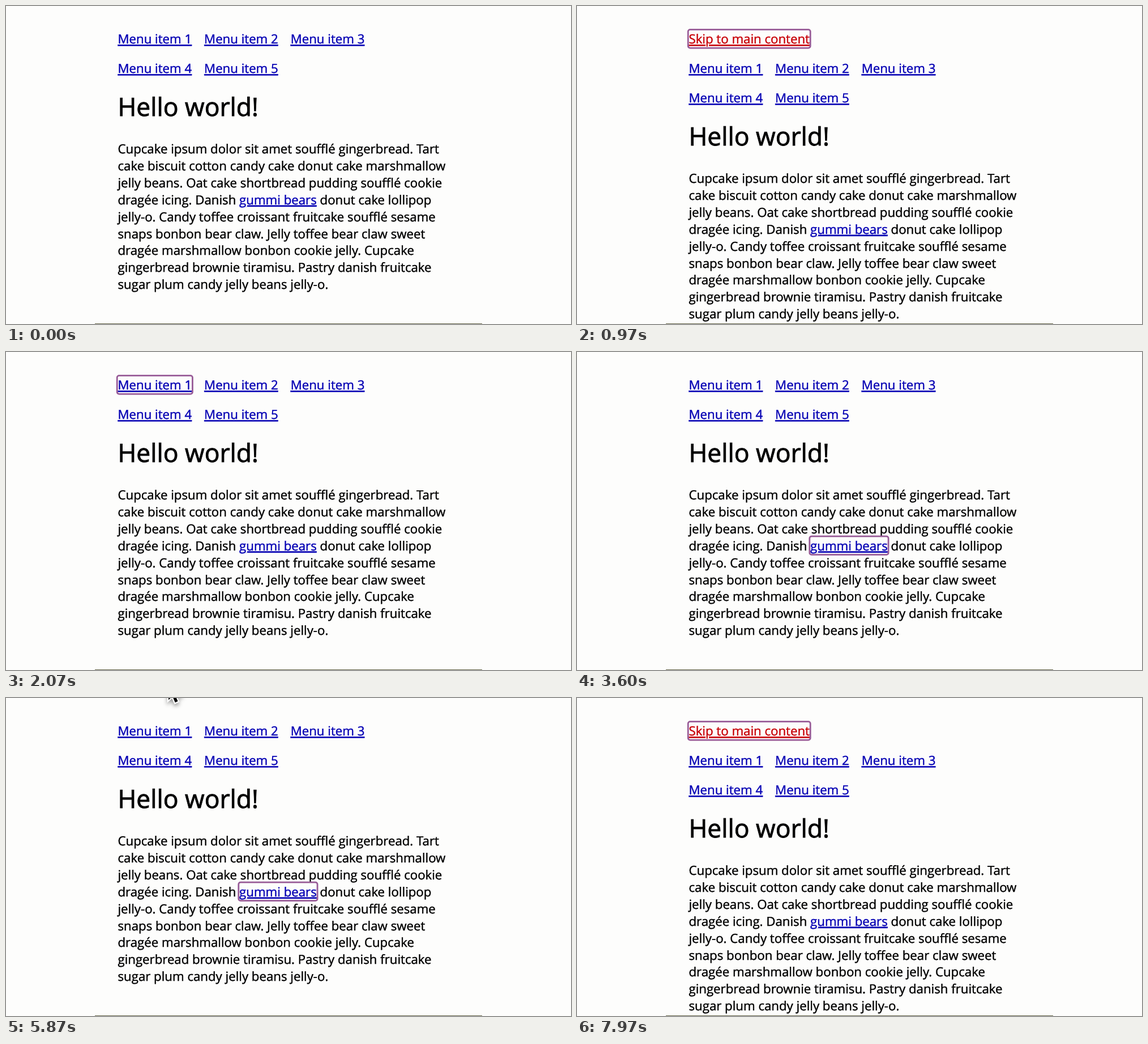
An HTML page that plays this animation: 998 by 561 pixels, repeating every 8000 ms.

```html
<!DOCTYPE html>
<html lang="en">
<head>
<meta charset="utf-8">
<title>Skip link demo</title>
<style>
  html, body { margin: 0; width: 100%; height: 100%; overflow: hidden; background: #fdfdfc; }
  svg { display: block; width: 100%; height: 100%; }
  text { font: 22.22px "Open Sans", sans-serif; text-rendering: geometricPrecision; white-space: pre; fill: #000; stroke: #000; stroke-width: .45px; }
  .title { font-size: 44.44px; stroke-width: .9px; }
  .link { fill: #0500b4; stroke: #0500b4; text-decoration: underline; text-decoration-thickness: 1.5px; text-underline-offset: 2px; }
  #skip { fill: #c80008; stroke: #c80008; }
  #ring { fill: none; stroke: #985b97; stroke-width: 2.8px; }
  #cursor { filter: drop-shadow(0 2px 2px #0006); }
</style>
</head>
<body>
<svg viewBox="0 0 998 561">
  <text id="skip" class="link" x="197.5" y="66.2">Skip to main content</text>
  <g id="page"></g>
  <rect id="ring" rx="3.5"/>
  <rect x="157" y="560" width="684" height="1" fill="#66664a"/>
  <path id="cursor" d="M0 0V16L3.7 12.6 6.2 18.4 8.7 17.3 6.2 11.6H11.2Z" stroke="#fff" stroke-width="2.4" paint-order="stroke"/>
</svg>
<script>
const LOOP = 8000, LEFT = 197.5, LINE = 29.86, MENU_STEP = 152.6, ROW_STEP = 52;
const byId = id => document.getElementById(id);
const page = byId('page'), skip = byId('skip'), ring = byId('ring'), cursor = byId('cursor');

function addText(x, y, content, className = '') {
  const text = document.createElementNS('http://www.w3.org/2000/svg', 'text');
  text.setAttribute('x', x);
  text.setAttribute('y', y);
  text.setAttribute('class', className);
  text.innerHTML = content;
  page.append(text);
}

for (let i = 0; i < 5; i++) {
  addText(LEFT + i % 3 * MENU_STEP, 66.2 + Math.floor(i / 3) * ROW_STEP, `Menu item ${i + 1}`, 'link');
}
addText(LEFT, 194.2, 'Hello world!', 'title');
[
  'Cupcake ipsum dolor sit amet soufflé gingerbread. Tart',
  'cake biscuit cotton candy cake donut cake marshmallow',
  'jelly beans. Oat cake shortbread pudding soufflé cookie',
  'dragée icing. Danish <tspan class="link">gummi bears</tspan> donut cake lollipop',
  'jelly-o. Candy toffee croissant fruitcake soufflé sesame',
  'snaps bonbon bear claw. Jelly toffee bear claw sweet',
  'dragée marshmallow bonbon cookie jelly. Cupcake',
  'gingerbread brownie tiramisu. Pastry danish fruitcake',
  'sugar plum candy jelly beans jelly-o.'
].forEach((line, i) => addText(LEFT, 260.2 + i * LINE, line));

// Tab order: skip link, five menu items, inline link
const links = [...document.querySelectorAll('.link')];
const NONE = -1;
const focusSteps = [
  [0, NONE], [30, 0], [1670, 1], [2140, 2], [2500, 3],
  [2870, 4], [3230, 5], [3600, 6], [6570, NONE], [7800, 0]
];

function drawRing(link) {
  ring.style.display = link ? '' : 'none';
  if (!link) return;
  const start = link.getStartPositionOfChar(0);
  ring.setAttribute('x', start.x - 1.3);
  ring.setAttribute('y', start.y - 24.6);
  ring.setAttribute('width', link.getComputedTextLength() + 2.6);
  ring.setAttribute('height', LINE + 2.6);
}

const ease = (t, from, to) => {
  const p = Math.min(1, Math.max(0, (t - from) / (to - from)));
  return p * p * (3 - 2 * p);
};

function draw(now) {
  const t = now % LOOP;
  const focused = focusSteps.findLast(([start]) => t >= start)[1];
  const skipShown = focused === 0;
  skip.style.display = skipShown ? '' : 'none';
  page.setAttribute('transform', `translate(0 ${skipShown ? ROW_STEP : 0})`);
  drawRing(links[focused]);

  const peek = ease(t, 5600, 5860) - ease(t, 6570, 6800);
  cursor.style.display = peek > 0 ? '' : 'none';
  cursor.setAttribute('transform', `translate(287 ${-47 + 20 * peek}) scale(1.9)`);
  requestAnimationFrame(draw);
}
requestAnimationFrame(draw);
</script>
</body>
</html>
```
